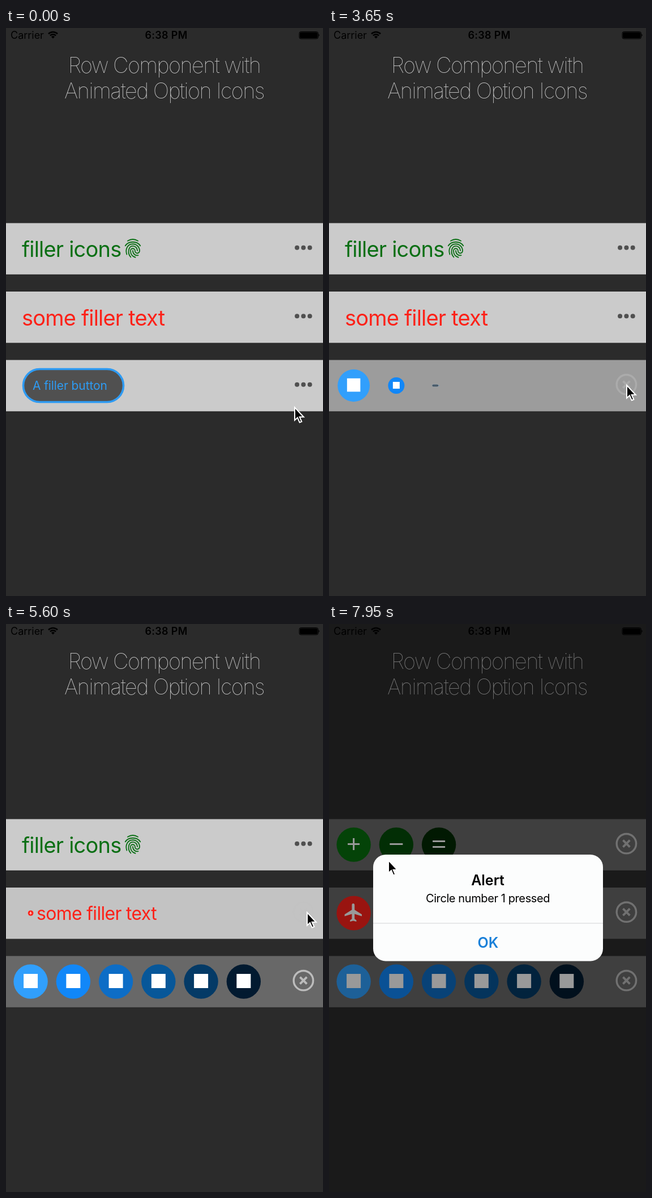
An HTML page for the animation above (8000 ms loop, 560 by 1000 pixels).

```html
<!DOCTYPE html>
<html lang="en">
<head>
<meta charset="utf-8">
<title>Row Component</title>
<style>
  html, body { margin: 0; width: 100%; height: 100%; overflow: hidden; background: #2b2b2b; }
  svg { display: block; width: 560px; height: 1000px; font-family: Inter, Roboto, sans-serif; }
  .title { font-size: 38px; font-weight: 100; letter-spacing: -1.6px; fill: #d4d4d4; text-anchor: middle; }
  .status { font-size: 18px; }
  .big { font-size: 38px; letter-spacing: -.8px; }
  .icon { fill: none; stroke: #fff; stroke-width: 3; }
  .solid { fill: #fff; stroke: none; }
  .mid { text-anchor: middle; }
</style>
</head>
<body>
<svg id="stage" viewBox="0 0 560 1000">
  <rect width="560" height="1000" fill="#2b2b2b"/>
  <g class="status">
    <text x="8" y="19">Carrier</text>
    <g id="signal" transform="translate(83 18.5)" fill="none" stroke="#000"></g>
    <text x="283" y="19" class="mid" font-weight="600" letter-spacing=".3">6:38 PM</text>
    <rect x="518" y="6.5" width="33.5" height="12.5" rx="3" fill="none" stroke="#000"/>
    <rect x="519" y="7.5" width="31.5" height="10.5" rx="2"/>
    <path d="M552.5 10.5q2.5 2.2 0 4.5z"/>
  </g>
  <text class="title" x="279.5" y="79">Row Component with</text>
  <text class="title" x="279.5" y="124">Animated Option Icons</text>
  <g id="rows"></g>
  <rect id="shade" width="560" height="1000" opacity="0"/>
  <g id="alert" opacity="0">
    <rect x="78" y="406" width="406" height="187.5" rx="22" fill="#fcfdfd"/>
    <path d="M78 526.8H484" stroke="#dcdcde" stroke-width="1.2"/>
    <g class="mid">
      <text x="280.5" y="460" font-size="25" font-weight="600">Alert</text>
      <text x="280.5" y="490" font-size="20" letter-spacing="-.4">Circle number 1 pressed</text>
      <text x="281" y="569.5" font-size="25" font-weight="600" fill="#1a80d9">OK</text>
    </g>
  </g>
  <path id="cursor" d="M0 1V23.5L5 19 8.7 27.5 12.3 26 8.6 17.7H15.8Z" stroke="#fff" stroke-width="2"/>
</svg>
<script>
const LOOP = 8000, STEP = 50;
const $ = id => document.getElementById(id);
const clamp = x => Math.max(0, Math.min(1, x));
const ease = x => x * x * (3 - 2 * x);
const mix = (a, b, k) => a + (b - a) * k;

// Arc around (0, y), angles in degrees from the positive x axis.
function arc(r, from, to, y = 0) {
  const at = a => `${(r * Math.cos(a * Math.PI / 180)).toFixed(2)} ${(y + r * Math.sin(a * Math.PI / 180)).toFixed(2)}`;
  return `M${at(from)}A${r} ${r} 0 0 1 ${at(to)}`;
}
const wedge = (r, from, to, y = 0) => `${arc(r, from, to, y)}L0 ${y}Z`;
const line = d => `<path d="${d}"/>`;

const square = '<rect class="solid" x="-12.5" y="-12.5" width="25" height="25"/>';
const plane = '<path class="solid" transform="scale(1.6) translate(-12 -12)" d="M21 16v-2l-8-5V3.5c0-.83-.67-1.5-1.5-1.5S10 2.67 10 3.5V9l-8 5v2l8-2.5V19l-2 1.5V22l3.5-1 3.5 1v-1.5L13 19v-5.5l8 2.5z"/>';
const hotspot = '<circle class="solid" r="3.4"/>' +
  line([8.5, 14.5].map(r => arc(r, -48, 48) + arc(r, 132, 228)).join(''));
const locate = '<circle r="11.7"/><circle class="solid" r="6.2"/>' +
  line('M0-17.5V-12M0 12V17.5M-17.5 0H-12M12 0H17.5');
const waves = `<path stroke-width="5" d="${arc(26, -128, -52, 14) + arc(17.2, -128, -52, 14)}"/>` +
  `<path class="solid" d="${wedge(9.8, -129, -51, 14)}"/>`;

const finger = `<g transform="translate(224 388) scale(1.56 1.66) translate(-12 -12)" fill="none" stroke="#0a6f14" stroke-width="1.15" stroke-linecap="round">
  <path d="M6.2 4C9.8 2 14.2 2 17.8 4M3.5 9.2C7.3 3.9 16.7 3.9 20.5 9.2M9.7 21.3C5.5 17.2 7 9.5 12 9.5A5.2 4.9 0 0 1 17.2 14.4
  M5.2 18.4C3.2 13 6 7.3 12 7.3A7.7 7.3 0 0 1 19.7 14.6A2.6 2.5 0 0 1 14.5 14.6A2.55 2.45 0 0 0 9.4 14.6C9.4 18.2 11.7 20.8 14.9 21.5
  M12 14.4C12 18 15 20 18.1 19.3"/></g>`;

// taps: [time, opens, delay between circles]
const rows = [
  { y: 388.5, cx: 134, taps: [[6050, 1, 110]],
    content: `<text class="big" x="28" y="403" fill="#0a6f14">filler icons</text>${finger}`,
    colors: ['#07700e', '#044d08', '#022a04'],
    icons: [line('M-10.5 0H10.5M0-10.5V10.5'), line('M-11.5 0H11.5'), line('M-11-5H11M-11 5H11')] },
  { y: 509, cx: 155, taps: [[5560, 1, 110]],
    content: '<text class="big" x="28" y="523.5" fill="#fd2118">some filler text</text>',
    colors: ['#fe221a', '#d81a14', '#9f100c', '#640806', '#3a0301'],
    icons: [plane, hotspot, square, locate, waves] },
  { y: 629.5, cx: 119,
    taps: [[880, 1, 110], [2350, 0, 75], [3415, 1, 115], [3960, 0, 40], [4518, 1, 80]],
    content: `<rect x="30.5" y="600.5" width="177" height="58" rx="29" fill="#505050" stroke="#2e9bf3" stroke-width="3.6"/>
      <text x="47" y="637" font-size="21" letter-spacing="-.1" fill="#2e9bf3">A filler button</text>`,
    colors: ['#319ffc', '#1187f8', '#0d6dc6', '#075799', '#043a66', '#021a30'],
    icons: Array(6).fill(square) }
];

$('signal').innerHTML =
  `<path stroke-width="2.6" d="${arc(11.5, -134, -46) + arc(7.2, -134, -46)}"/>` +
  `<path fill="#000" stroke="none" d="${wedge(4.3, -134, -46)}"/>`;

$('rows').innerHTML = rows.map(r => `<g>
  <rect class="bar" y="${r.y - 45}" width="560" height="90.3"/>
  <g class="content">${r.content}</g>
  ${r.colors.map((c, i) => `<g class="disc"><circle r="30.2" fill="${c}"/><g class="icon" transform="translate(0 -1)">${r.icons[i]}</g></g>`).join('')}
  <g transform="translate(525.4 ${r.y - 1.8})">
    <g class="dots" fill="#505050"><circle cx="-11.3" r="4"/><circle r="4"/><circle cx="11.3" r="4"/></g>
    <g class="close" fill="none" stroke="#bcbcbc" stroke-width="3.4"><circle r="17.2"/><path d="M-6-6L6 6M6-6L-6 6" stroke-width="3.8"/></g>
  </g></g>`).join('');

rows.forEach((r, i) => {
  const g = $('rows').children[i];
  for (const name of ['bar', 'content', 'dots', 'close']) r[name] = g.querySelector('.' + name);
  r.discs = [...g.querySelectorAll('.disc')];
});

// Value between 0 (closed) and 1 (open) after all taps so far.
function level(taps, t, lag, openTime, closeTime) {
  let v = 0;
  taps.forEach(([at, open, gap], k) => {
    if (t <= at) return;
    const end = taps[k + 1] ? Math.min(t, taps[k + 1][0]) : t;
    v = mix(v, open, clamp((end - at - lag(open) * gap) / (open ? openTime : closeTime)));
  });
  return v;
}

function drawRow(r, t) {
  const n = r.discs.length;
  const p = level(r.taps, t, () => 0, 500, 500);
  const sizes = r.discs.map((_, i) => level(r.taps, t, open => open ? i : n - 1 - i, 250, 330));
  const shade = Math.round(mix(203, 104, p));
  r.bar.setAttribute('fill', `rgb(${shade},${shade},${shade})`);
  r.discs.forEach((d, i) =>
    d.setAttribute('transform', `translate(${43.6 + 75.25 * i} ${r.y}) scale(${sizes[i]})`));
  const shift = 75 * sizes[0] ** 1.4;
  r.content.setAttribute('transform',
    `translate(${r.cx + shift} ${r.y}) scale(${1 - sizes[0]}) translate(${-r.cx} ${-r.y})`);
  const last = r.taps.filter(tap => tap[0] < t).pop();
  const open = last && last[1];
  r.dots.setAttribute('opacity', open ? 0 : 1 - p);
  r.close.setAttribute('opacity', open ? p : 0);
}

// [time, x, y]
const path = [[0, 510, 667], [250, 510, 667], [750, 526, 628], [5180, 526, 628], [5480, 532, 507],
  [5650, 532, 507], [5950, 532, 373], [6550, 532, 373], [6900, 300, 395], [7350, 105, 415], [LOOP, 105, 415]];

function moveCursor(t) {
  const k = path.findIndex(s => s[0] > t);
  const [t0, x0, y0] = path[k - 1], [t1, x1, y1] = path[k];
  const e = ease((t - t0) / (t1 - t0));
  $('cursor').setAttribute('transform', `translate(${mix(x0, x1, e)} ${mix(y0, y1, e)})`);
}

function draw(t) {
  rows.forEach(r => drawRow(r, t));
  moveCursor(t);
  const a = clamp((t - 7700) / 250);
  const s = mix(1.15, 1, 1 - (1 - a) ** 2);
  $('shade').setAttribute('opacity', .4 * a);
  $('alert').setAttribute('opacity', a);
  $('alert').setAttribute('transform', `translate(281 500) scale(${s}) translate(-281 -500)`);
}

const start = performance.now();
function tick() {
  const t = (performance.now() - start) % LOOP;
  draw(Math.floor(t / STEP) * STEP);
  requestAnimationFrame(tick);
}
tick();
</script>
</body>
</html>
```
